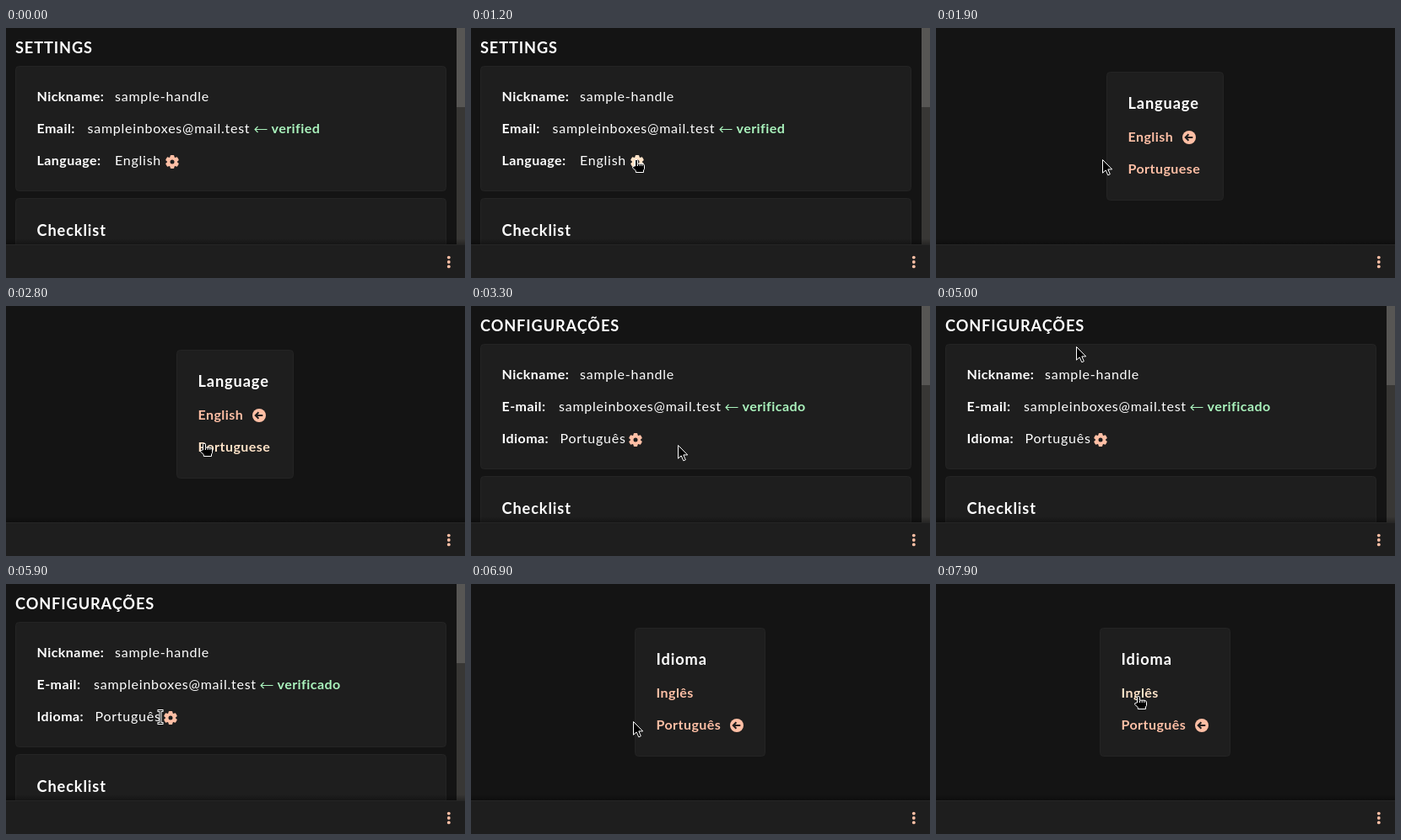
These frames come from a looping animation (544x297 px, 8000 ms). An HTML page:

```html
<!DOCTYPE html>
<html lang="en">
<head>
<meta charset="utf-8">
<title>Language settings</title>
<style>
  html, body { margin: 0; width: 100%; height: 100%; overflow: hidden; background: #141414; }
  svg { display: block; width: 100vw; height: 100vh; }
  text { font: 16px Lato, "Open Sans", sans-serif; letter-spacing: .76px; fill: #fff; white-space: pre; }
  .bold, .link { font-weight: 700; letter-spacing: .45px; }
  .title { font-weight: 700; font-size: 18.2px; letter-spacing: .88px; }
  .link { fill: #ffbfa5; }
  .link.hover { fill: #ffe3c8; }
  .ok { fill: #aaf3bd; }
  .panel { fill: #1e1e1e; stroke: #242424; }
  .gear { pointer-events: bounding-box; }
  #cursor { pointer-events: none; stroke-linejoin: round; }
</style>
</head>
<body>
<svg viewBox="0 0 544 297">
  <defs>
    <linearGradient id="shade" x2="0" y2="1">
      <stop stop-color="#000" stop-opacity="0"/>
      <stop offset="1" stop-color="#000" stop-opacity=".3"/>
    </linearGradient>
  </defs>
  <rect width="544" height="297" fill="#141414"/>
  <g id="scenes"></g>
  <rect y="250" width="544" height="7" fill="url(#shade)"/>
  <rect y="257" width="544" height="40" fill="#1e1e1e"/>
  <rect y="257" width="544" height="1" fill="#262626"/>
  <g fill="#ffbfa5">
    <circle cx="524.8" cy="272.6" r="1.9"/>
    <circle cx="524.8" cy="278" r="1.9"/>
    <circle cx="524.8" cy="283.4" r="1.9"/>
  </g>
  <g id="cursor" fill="#000" stroke="#fff">
    <path data-kind="arrow" d="M.5 .5V16.2L4.2 12.9 6.8 18.8 9.3 17.7 6.8 11.9H11.7Z"/>
    <path data-kind="hand" d="M-1.5 7V.8a1.5 1.5 0 0 1 3 0V4.2H7Q9.5 4.4 9.5 7V10.5L8.5 12V14.5H-.7V12.5L-4.4 9.2Q-4.8 7.2-2.8 7.2ZM1.5 4.5V7M4.2 4.5V7M6.8 4.5V7"/>
    <g data-kind="beam" fill="none" stroke-linecap="square">
      <path d="M-2-7.5H2M0-7.5V7.5M-2 7.5H2" stroke-width="3"/>
      <path d="M-2-7.5H2M0-7.5V7.5M-2 7.5H2" stroke="#000"/>
    </g>
  </g>
</svg>
<script>
const LOOP = 8000, STEP = 100;

const text = (x, y, cls, str) => `<text x="${x}" y="${y}" class="${cls}">${str}</text>`;
const panel = (x, y, w, h) => `<rect class="panel" x="${x}" y="${y}" width="${w}" height="${h}" rx="4"/>`;

const gear = (x, y) => `<g class="link gear" transform="translate(${x} ${y})">
  <circle r="6.2"/>${[0, 60, 120].map(a =>
    `<rect x="-2.4" y="-8" width="4.8" height="16" rx="1.2" transform="rotate(${a})"/>`).join("")}
  <circle r="2.5" fill="#1e1e1e"/></g>`;

const badge = (x, y) => `<g transform="translate(${x} ${y})"><circle r="8"/>
  <path d="M4.3 0H-4M-.6-3.7L-4.3 0-.6 3.7" fill="none" stroke="#1e1e1e" stroke-width="2"/></g>`;

const settings = s => `
  ${text(11, 30, "title", s.title)}
  ${panel(11.5, 45.5, 510, 148)}${panel(11.5, 202.5, 510, 80)}
  ${text(36.5, 87, "bold", "Nickname:")}${text(129, 87, "", "sample-handle")}
  ${text(36.5, 125, "bold", s.mail)}${text(s.mailX, 125, "", "sampleinboxes@mail.test")}
  <path d="M${s.okX - 5} 120.5h-14.5m3.5-3.5l-3.5 3.5 3.5 3.5" fill="none" stroke="#aaf3bd" stroke-width="1.1"/>
  ${text(s.okX, 125, "bold ok", s.ok)}
  ${text(36.5, 163, "bold", s.label)}${text(s.valueX, 163, "", s.value)}
  ${gear(s.gearX, 159)}
  ${text(36.5, 247, "title", "Checklist")}
  <rect x="534" width="10" height="257" fill="#383735"/>
  <rect x="534" width="10" height="94" fill="#575654"/>`;

const dialog = d => `
  ${panel(d.x, 52.5, d.w, 152)}
  ${text(d.x + 25, 96, "title", d.title)}
  ${d.options.map((name, i) => {
    const y = 135 + 38 * i;
    return `<g class="link">${text(d.x + 25, y, "link", name)}${
      i === d.chosen ? badge(d.badgeX, y - 5) : ""}</g>`;
  }).join("")}`;

// Each scene shows up at its time, partly faded in, on an empty page.
const scenes = [
  { at: 0, fade: 0, body: settings({ title: "SETTINGS", mail: "Email:", mailX: 96.5, okX: 314.5,
      ok: "verified", label: "Language:", value: "English", valueX: 129, gearX: 197 }) },
  { at: 1800, fade: 200, body: dialog({ x: 202.5, w: 138, title: "Language",
      options: ["English", "Portuguese"], chosen: 0, badgeX: 300 }) },
  { at: 3200, fade: 200, body: settings({ title: "CONFIGURAÇÕES", mail: "E-mail:", mailX: 104,
      okX: 321.5, ok: "verificado", label: "Idioma:", value: "Português", valueX: 105.5, gearX: 195 }) },
  { at: 6700, fade: 300, body: dialog({ x: 194.5, w: 154, title: "Idioma",
      options: ["Inglês", "Português"], chosen: 1, badgeX: 315 }) }
];

// Pointer route: time, x, y
const route = [
  [500, 237, 13], [700, 200, 52], [900, 173, 105], [1000, 171, 130], [1200, 196, 157],
  [2200, 197, 156], [2400, 221, 159], [2500, 221, 159], [2600, 230, 162], [2800, 235, 164], [3100, 245, 165],
  [3900, 245, 165], [4100, 205, 100], [4300, 133, 39], [4500, 85, 28], [4800, 182, 49],
  [4900, 174, 48], [5000, 166, 48], [5200, 166, 48], [5500, 146, 88], [5700, 165, 135],
  [5900, 183, 158], [6100, 192, 163],
  [7300, 192, 163], [7500, 222, 166], [7700, 236, 150], [7900, 240, 134]
];

const root = document.getElementById("scenes");
for (const s of scenes) {
  s.el = document.createElementNS("http://www.w3.org/2000/svg", "g");
  s.el.innerHTML = s.body;
  root.append(s.el);
}
const cursor = document.getElementById("cursor");
const shapes = [...cursor.children];
const links = [...root.querySelectorAll(".link")];

function pointerAt(t) {
  const next = route.findIndex(p => p[0] > t);
  if (next === 0) return null;
  if (next < 0) return route[route.length - 1].slice(1);
  const [t0, x0, y0] = route[next - 1], [t1, x1, y1] = route[next];
  const k = (t - t0) / (t1 - t0);
  return [x0 + (x1 - x0) * k, y0 + (y1 - y0) * k];
}

function draw(t) {
  const current = scenes.filter(s => s.at <= t).pop();
  for (const s of scenes) s.el.style.display = s === current ? "" : "none";
  current.el.style.opacity = current.fade ? Math.min(1, (t + STEP - current.at) / current.fade) : 1;

  const pos = pointerAt(t);
  cursor.style.display = pos ? "" : "none";
  let link = null;
  if (pos) {
    const hit = document.elementFromPoint(...pos);
    link = hit && (hit.closest("g.link") || hit.closest(".link"));
    const kind = link ? "hand" : hit && hit.tagName === "text" ? "beam" : "arrow";
    cursor.setAttribute("transform", `translate(${pos.map(Math.round)})`);
    for (const s of shapes) s.style.display = s.dataset.kind === kind ? "" : "none";
  }
  for (const l of links) l.classList.toggle("hover", !!link && link.contains(l));
}

function tick() {
  draw(Math.floor(performance.now() % LOOP / STEP) * STEP);
  requestAnimationFrame(tick);
}
tick();
</script>
</body>
</html>
```
